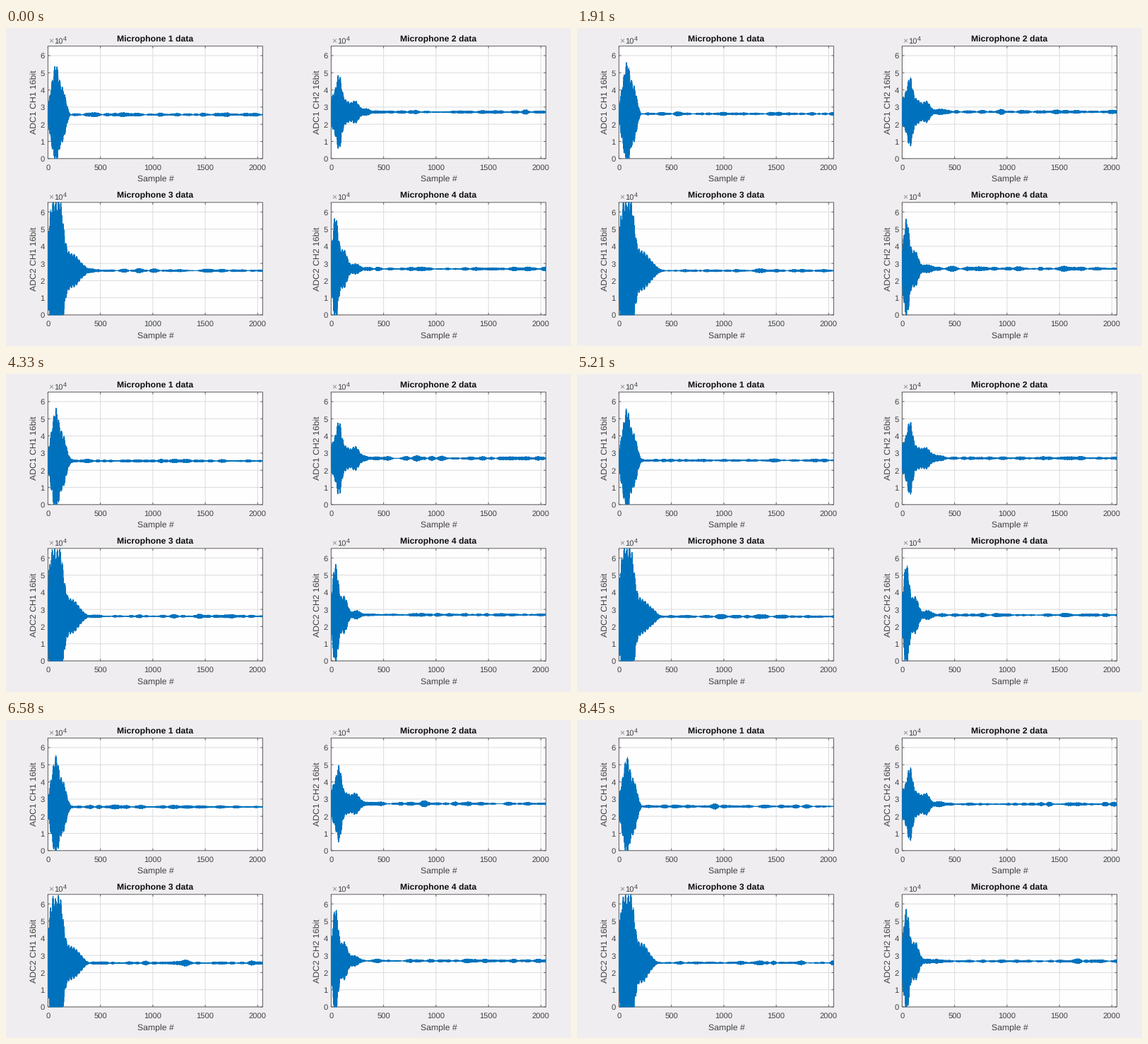
Write a matplotlib script that moves like this. It is 800 px wide and 450 px high and loops after 8550 ms.

```python
import numpy as np
import matplotlib.pyplot as plt
from matplotlib.animation import FuncAnimation
from matplotlib.collections import LineCollection
from matplotlib.patches import Rectangle

plt.rcParams["text.hinting"] = "none"

W, H, DPI = 800, 450, 100
PX = 72 / DPI                      # points per pixel
FRAMES, INTERVAL, LAST = 285, 30, 281

BLUE, INK, AXIS, GRID = "#0072bd", "#404040", "#606060", "#dcdcdc"
SAMPLES, FULL = 2048, 65535
BOX_W, BOX_H = 304.1, 159.2
SX, SY = BOX_W / SAMPLES, BOX_H / FULL
FREQ = 0.24                        # carrier, cycles per sample
NOISE = 660

n = np.arange(SAMPLES)


def bumps(*parts):
    """Sum of Gaussians given as (centre, width, height)."""
    return sum(h * np.exp(-0.5 * ((n - c) / w) ** 2) for c, w, h in parts)


# resting level and echo envelope of each microphone
MICS = [
    (25650, bumps((25, 22, 9e3), (75, 28, 28.5e3), (143, 31, 14.5e3))),
    (27150, bumps((20, 30, 9e3), (75, 24, 18.3e3), (140, 40, 6.5e3),
                  (232, 32, 5.8e3), (340, 50, 1.5e3))),
    (25650, bumps((5, 16, 9e3), (42, 28, 33e3), (110, 34, 35e3), (215, 78, 10.5e3))),
    (26600, bumps((40, 28, 30.5e3), (125, 30, 10.5e3), (235, 40, 2.5e3))),
]

k = np.arange(-75, 76)
KERNEL = np.exp(-0.5 * (k / 25) ** 2)
KERNEL /= np.sqrt(2 * np.sum(KERNEL ** 2))

fig = plt.figure(figsize=(W / DPI, H / DPI), dpi=DPI, facecolor="#efedf0")
ax = fig.add_axes([0, 0, 1, 1])
ax.set(xlim=(0, W), ylim=(H, 0))
ax.axis("off")


def label(x, y, s, size=11.2, color=INK, ha="center", **kw):
    ax.text(x, y, s, fontsize=size * PX, color=color, ha=ha, va="baseline",
            family="Liberation Sans", rotation_mode="anchor", **kw)


def strokes(segs, color):
    lc = LineCollection(segs, colors=color, linewidths=PX, zorder=2)
    lc.set_snap(False)
    ax.add_collection(lc, autolim=False)


def panel(i):
    row, col = divmod(i, 2)
    x0, y0 = 59.4 + 401 * col, 184.8 + 221.2 * row
    x1, y1 = x0 + BOX_W, y0 - BOX_H
    mid = (x0 + x1) / 2
    ax.add_patch(Rectangle((x0, y1), BOX_W, BOX_H, fc="#fefefe", ec="none", zorder=1))

    grid, ticks = [], []
    for v in range(0, 2001, 500):
        x = x0 + v * SX
        grid.append([(x, y0), (x, y1)])
        ticks += [[(x, y0), (x, y0 - 3)], [(x, y1), (x, y1 + 3)]]
        label(x, y0 + 16.2, str(v))
    for v in range(7):
        y = y0 - v * 1e4 * SY
        grid.append([(x0, y), (x1, y)])
        ticks += [[(x0, y), (x0 + 3, y)], [(x1, y), (x1 - 3, y)]]
        label(x0 - 4.7, y + 4.3, str(v), ha="right")
    strokes(grid, GRID)
    strokes(ticks + [[(x0, y0), (x1, y0), (x1, y1), (x0, y1), (x0, y0)]], AXIS)

    label(mid, y1 - 6, f"Microphone {i + 1} data", 12.3, "#101010", weight="bold")
    label(mid, y0 + 33.2, "Sample #", 12.3)
    label(x0 - 17, y0 - BOX_H / 2, f"ADC{row + 1} CH{col + 1} 16bit", 12.3, rotation=90)
    label(x0 + 1, y1 - 3.6, "×", 12, "#8a8a8a", ha="left")
    label(x0 + 8.5, y1 - 3.6, "10", ha="left")
    label(x0 + 21.5, y1 - 8, "4", 9, ha="left")

    line, = ax.plot([], [], color=BLUE, lw=0.95 * PX, zorder=3)
    line.set_clip_path(Rectangle((x0 - 0.5, y1 - 0.5), BOX_W + 1, BOX_H + 1,
                                 transform=ax.transData))
    return line, x0, y0


panels = [panel(i) for i in range(4)]


def capture(rng, level, env):
    """One recording: decaying echo plus narrow-band noise on a carrier."""
    re, im = rng.normal(size=(2, SAMPLES + len(k) - 1))
    noise = np.convolve(re + 1j * im, KERNEL, "valid") * NOISE
    echo = env * rng.normal(1, 0.018)
    wave = (echo + noise) * np.exp(2j * np.pi * (FREQ * n + rng.random()))
    return np.clip(level + rng.normal(0, 180) + wave.real, 0, FULL)


def update(f):
    rng = np.random.default_rng(500 + min(f, LAST))
    for (line, x0, y0), (level, env) in zip(panels, MICS):
        line.set_data(x0 + n * SX, y0 - capture(rng, level, env) * SY)
    return [p[0] for p in panels]


anim = FuncAnimation(fig, update, frames=FRAMES, interval=INTERVAL,
                     repeat=True, repeat_delay=0, blit=True)
plt.show()
```
